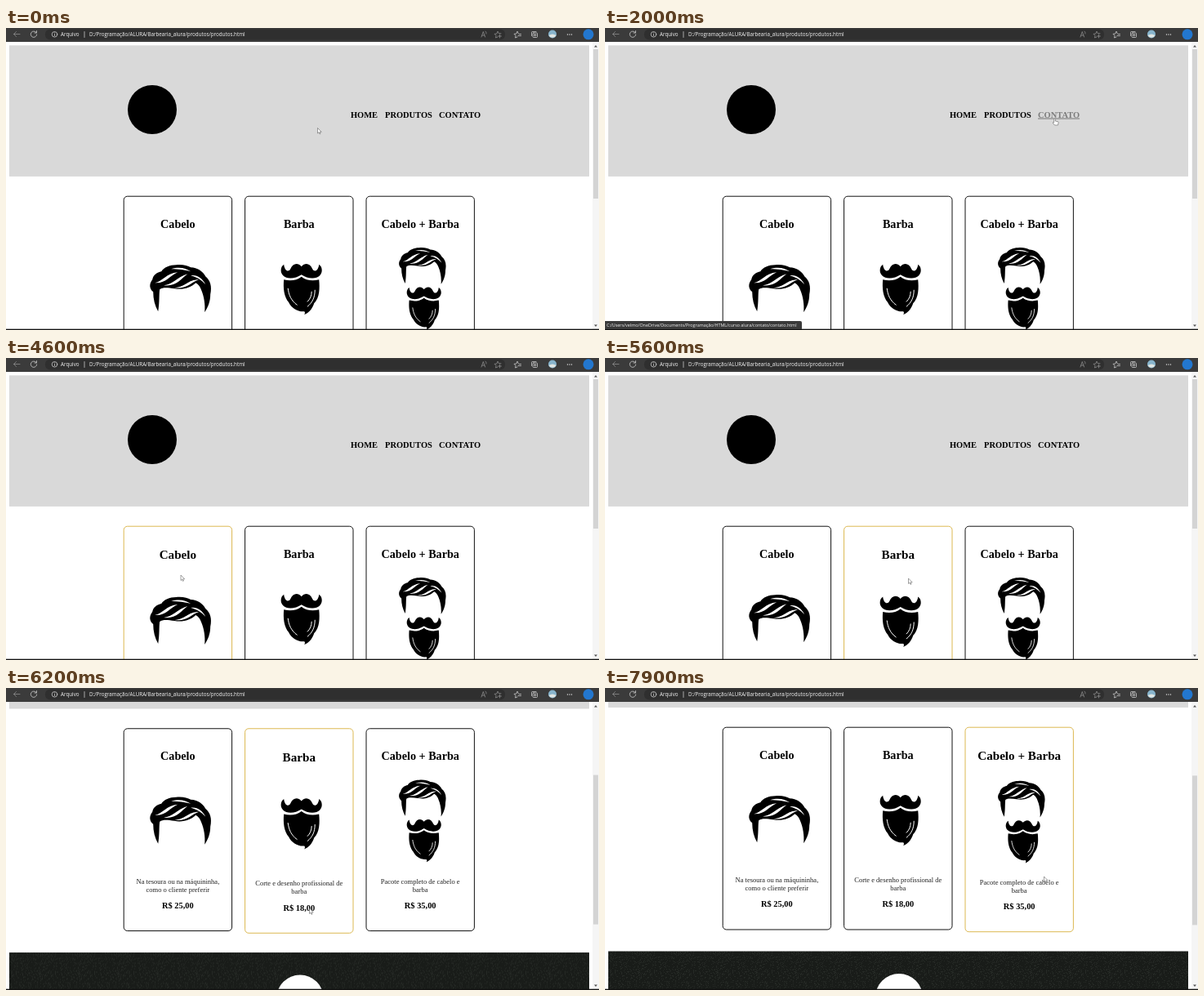
An HTML page that plays this animation: 726x370 px, repeating every 8000 ms.

```html
<!DOCTYPE html>
<html lang="pt-BR">
<head>
<meta charset="utf-8">
<title>Produtos</title>
<style>
  html, body { margin: 0; width: 100%; height: 100%; overflow: hidden; background: #fff; }
  svg { display: block; width: 100vw; height: 100vh; }
  .serif { font-family: "Liberation Serif", serif; }
  .bold { font-weight: bold; }
  .mid { text-anchor: middle; }
  .ui { font-family: "Open Sans", sans-serif; fill: #f4f4f4; }
  .nav { font-size: 10.45px; }
  .nav.hover { fill: #7b7b7b; text-decoration: underline; }
  .desc { font-size: 8.51px; fill: #222; }
  .price { font-size: 10.4px; }
  .frame { fill: none; stroke: #111; }
  .icon { fill: none; stroke: #ddd; stroke-width: .7; stroke-linecap: round; stroke-linejoin: round; }
  .dim { stroke: #999; }
  .pointer { fill: #fff; stroke: #555; stroke-width: .55; stroke-linejoin: round; }
</style>
</head>
<body>
<svg id="stage" viewBox="0 0 726 370">
  <defs>
    <pattern id="grain" width="48" height="48" patternUnits="userSpaceOnUse">
      <rect width="48" height="48" fill="#191c19"/>
      <path id="grainDots" fill="#262a26"/>
    </pattern>
    <g id="hair">
      <path d="M10 57C6 50 4 42 4 33C-1 29-1 23 3 18C4 12 9 9 14 8C17 3 24 0 32 0C40-1 46 1 50 3C58 3 65 8 68 14C74 19 76 26 74 36C74 45 71 52 67 58C68 48 66 38 63 31C61 25 58 23 56 22C50 28 40 31 30 29C22 28 16 27 12 30C11 36 12 46 10 57Z"/>
      <path fill="#fff" d="M6 22C16 20 20 10 34 9C24 13 20 23 6 22ZM17 25C28 24 33 15 46 11C38 17 32 27 17 25ZM30 28C44 27 46 18 60 18C50 21 46 30 30 28ZM26 5C36 2 44 4 50 8C42 6 36 5 26 5ZM50 13C58 12 64 16 68 24C63 18 57 15 50 13Z"/>
    </g>
    <g id="beard">
      <path d="M25.500 4C21-1 15 0 12 7C10 11 5 10 4 1.500C0 4-1 11 3 15C8 20 18 19 25.500 14C33 19 43 20 48 15C52 11 51 4 47 1.500C46 10 41 11 39 7C36 0 30-1 25.500 4Z"/>
      <path d="M4 20C12 22 20 21 25.500 16.500C31 21 39 22 47 20C48 30 48 42 41 49C39 56 34 61 29 63C30 61 30 60 29 59C22 60 13 55 10 48C4 41 3 30 4 20Z"/>
      <path d="M9 31C10 39 13 46 20 51M42 33C42 42 39 48 33 53M38 35C38 40 36 44 33 47" fill="none" stroke="#fff" stroke-linecap="round"/>
    </g>
  </defs>

  <rect width="726" height="370" fill="#fff"/>
  <g id="page">
    <rect x="4" y="21.300" width="710" height="160.600" fill="#d9d9d9"/>
    <circle cx="179" cy="100" r="30"/>
    <rect x="4" y="480.500" width="710" height="120" fill="url(#grain)"/>
    <circle cx="360" cy="537" r="29" fill="#fff"/>
  </g>

  <rect x="718" y="17" width="8" height="352" fill="#f5f5f5"/>
  <rect id="thumb" x="719" y="26" width="6" height="183" fill="#d4d4d4"/>
  <path d="M720 23.500l2-2.500 2 2.500zM720 363.500l2 2.500 2-2.500z" fill="#555"/>

  <rect width="726" height="17" fill="#3b3b3b"/>
  <rect x="48" y="1.500" width="563" height="13" rx="6" fill="#2f2f2f"/>
  <g class="icon">
    <path class="dim" d="M17 7.500H9.500M12.500 4.500l-3 3 3 3"/>
    <path d="M37 5.500A3.700 3.700 0 1 0 37.700 8M37.500 3.500V6H35"/>
    <circle cx="59.500" cy="7.800" r="3.300"/>
    <path d="M59.500 7.500v2M59.500 5.800v.1M96 4.500v7"/>
    <path class="dim" d="M582 11l2.300-6.500 2.300 6.500M583 9h2.700M587 4q1.500 1 1 3"/>
    <path class="dim" d="M602 11l-2.500 1 .5-2.700-2-2 2.800-.3L602 4l1.200 2.500 2.800.3M604.500 8v4M602.500 10h4"/>
    <path d="M626 11l-2.500 1 .5-2.700-2-2 2.800-.3L626 4l1.200 2.500M628 7.500h2.500M627 9.500h3.500"/>
    <rect x="645" y="6" width="5.500" height="5.500" rx="1"/>
    <path d="M643.500 9.500V5.500q0-1 1-1H649M647.700 7.200v3M646.200 8.700h3"/>
    <path d="M687.500 8h.01M690 8h.01M692.500 8h.01" stroke-width="1.400"/>
  </g>
  <circle cx="669" cy="7.500" r="5" fill="#87b4cc"/>
  <path d="M664.500 9q4.500-3 9 0a5 5 0 0 1-9 0z" fill="#e1e6e2"/>
  <circle cx="713" cy="7.800" r="6.500" fill="#2377cf"/>
  <g class="ui" font-size="6.250">
    <text x="67" y="10.200">Arquivo</text>
    <text x="102" y="10.200">D:/Programação/ALURA/Barbearia_alura/produtos/produtos.html</text>
  </g>

  <rect y="368.700" width="726" height="1.300" fill="#111"/>
  <g id="status">
    <path d="M0 359H239q2 0 2 2V369H0z" fill="#3a3a3a"/>
    <text id="statusText" class="ui" x="2" y="366" font-size="5.400"></text>
  </g>
  <path id="arrow" class="pointer" d="M0 0V6.500L1.500 5.200 2.500 7.400 3.500 7 2.600 4.800H4.700Z"/>
  <path id="hand" class="pointer" d="M-.8.6Q0-.5.8.6V3L4 3.700Q4.800 4 4.600 5L4 8H0L-2.400 5Q-2 3.800-.8 4.800Z"/>
</svg>
<script>
const LOOP = 8000;
const CARD_TOP = 206.2, CARD_WIDTH = 132.4, CARD_HEIGHT = 247.8;
const $ = id => document.getElementById(id);

const links = [
  { label: 'HOME', x: 422, end: 455 },
  { label: 'PRODUTOS', x: 464, end: 522 },
  { label: 'CONTATO', x: 530, end: 582 },
];
const cards = [
  { x: 144.2, title: 'Cabelo', art: [['hair', 32, 84, 1]],
    lines: ['Na tesoura ou na máquininha,', 'como o cliente preferir'], price: 'R$ 25,00' },
  { x: 292.6, title: 'Barba', art: [['beard', 43.6, 82, 1]],
    lines: ['Corte e desenho profissional de', 'barba'], price: 'R$ 18,00' },
  { x: 441, title: 'Cabelo + Barba', art: [['hair', 40, 63, .77], ['beard', 49.3, 110.6, .84]],
    lines: ['Pacote completo de cabelo e', 'barba'], price: 'R$ 35,00' },
];

// time, x, y of the pointer tip
const pointerKeys = [
  [0, 381.5, 122.5], [50, 381.5, 122.5], [600, 460, 116], [700, 460, 116], [800, 466, 110],
  [1600, 555, 106], [1700, 550.5, 111], [2000, 550.5, 111], [2500, 447, 114], [2750, 447, 114],
  [2800, 444, 109], [2950, 444, 109], [3300, 445.5, 136], [3500, 445.5, 136], [4200, 212, 262],
  [4500, 212, 262], [4600, 214, 266], [4850, 214, 266], [5200, 371.5, 270], [6450, 371.5, 270],
  [6850, 215, 240], [7300, 362, 238], [7500, 372, 236], [7700, 372, 236], [7900, 537.5, 231],
  [LOOP, 537.5, 231],
];

// the address bubble lags behind the pointer
const statusKeys = [
  [800, 'produtos/produtos.ht...'], [1300, 'contato/contato.html'], [2300, 'produtos/produtos.ht...'],
  [2800, 'pagina_inicial/index.h...'], [3600, ''],
];
const STATUS_ROOT = 'C:/Users/velmo/OneDrive/Documents/Programação/HTML/curso alura/';

function build() {
  const page = $('page');
  const text = (cls, x, y, s) => `<text class="serif ${cls}" x="${x}" y="${y}">${s}</text>`;
  page.insertAdjacentHTML('beforeend',
    links.map(l => text('bold nav', l.x, 109.5, l.label)).join('') +
    cards.map(c => {
      const mid = CARD_WIDTH / 2;
      const art = c.art.map(([id, x, y, k]) =>
        `<use href="#${id}" transform="translate(${x} ${y}) scale(${k})"/>`).join('');
      return `<g class="card" transform="translate(${c.x} ${CARD_TOP})">
        <rect class="frame" width="${CARD_WIDTH}" height="${CARD_HEIGHT}" rx="4.5"/>
        ${text('bold mid title', mid, 38.5, c.title)}
        <g class="body">${art}
          ${c.lines.map((s, i) => text('mid desc', mid, 190 + 9.8 * i, s)).join('')}
          ${text('bold mid price', mid, 220.3, c.price)}
        </g></g>`;
    }).join(''));

  const navNodes = page.querySelectorAll('.nav');
  links.forEach((l, i) => l.node = navNodes[i]);
  page.querySelectorAll('.card').forEach((node, i) => {
    for (const part of ['frame', 'title', 'body']) cards[i][part] = node.querySelector('.' + part);
  });

  let seed = 7, dots = '';
  const random = n => (seed = seed * 16807 % 2147483647) % n;
  for (let i = 0; i < 420; i++) dots += `M${random(48)} ${random(48)}h1v1h-1z`;
  $('grainDots').setAttribute('d', dots);
}

function pointerAt(t) {
  const i = pointerKeys.findIndex(k => k[0] > t);
  const [t0, x0, y0] = pointerKeys[i - 1], [t1, x1, y1] = pointerKeys[i];
  const u = (t - t0) / (t1 - t0), e = u * u * (3 - 2 * u);
  return [x0 + (x1 - x0) * e, y0 + (y1 - y0) * e];
}

function scrollAt(t) {
  const u = Math.min(1, Math.max(0, (t - 5610) / 790));
  return 158 * (1 - (1 - u) ** 3.35);
}

function setHover(card, on) {
  card.frame.style.stroke = on ? '#dcb850' : '';
  card.frame.setAttribute('height', CARD_HEIGHT + (on ? 2.7 : 0));
  card.title.setAttribute('font-size', on ? 15.13 : 14.18);
  card.title.setAttribute('y', on ? 40.2 : 38.5);
  card.body.setAttribute('transform', `translate(0 ${on ? 2.7 : 0})`);
}

function draw(t) {
  const [x, y] = pointerAt(t), scroll = scrollAt(t);
  $('page').setAttribute('transform', `translate(0 ${-scroll})`);
  $('thumb').setAttribute('y', 26 + scroll * .515);

  let overLink = false;
  for (const l of links) {
    const on = x >= l.x && x <= l.end && y > 100 && y < 112.5 && scroll === 0;
    l.node.classList.toggle('hover', on);
    overLink ||= on;
  }
  const pageY = y + scroll - CARD_TOP;
  for (const c of cards)
    setHover(c, x > c.x && x < c.x + CARD_WIDTH && pageY > 0 && pageY < CARD_HEIGHT);

  const address = statusKeys.filter(k => k[0] <= t).pop()?.[1];
  $('status').style.display = address ? '' : 'none';
  $('statusText').textContent = STATUS_ROOT + (address || '');

  for (const [id, shown] of [['arrow', !overLink], ['hand', overLink]]) {
    $(id).style.display = shown ? '' : 'none';
    $(id).setAttribute('transform', `translate(${x} ${y})`);
  }
}

function tick() {
  draw(performance.now() % LOOP);
  requestAnimationFrame(tick);
}

build();
tick();
</script>
</body>
</html>
```
